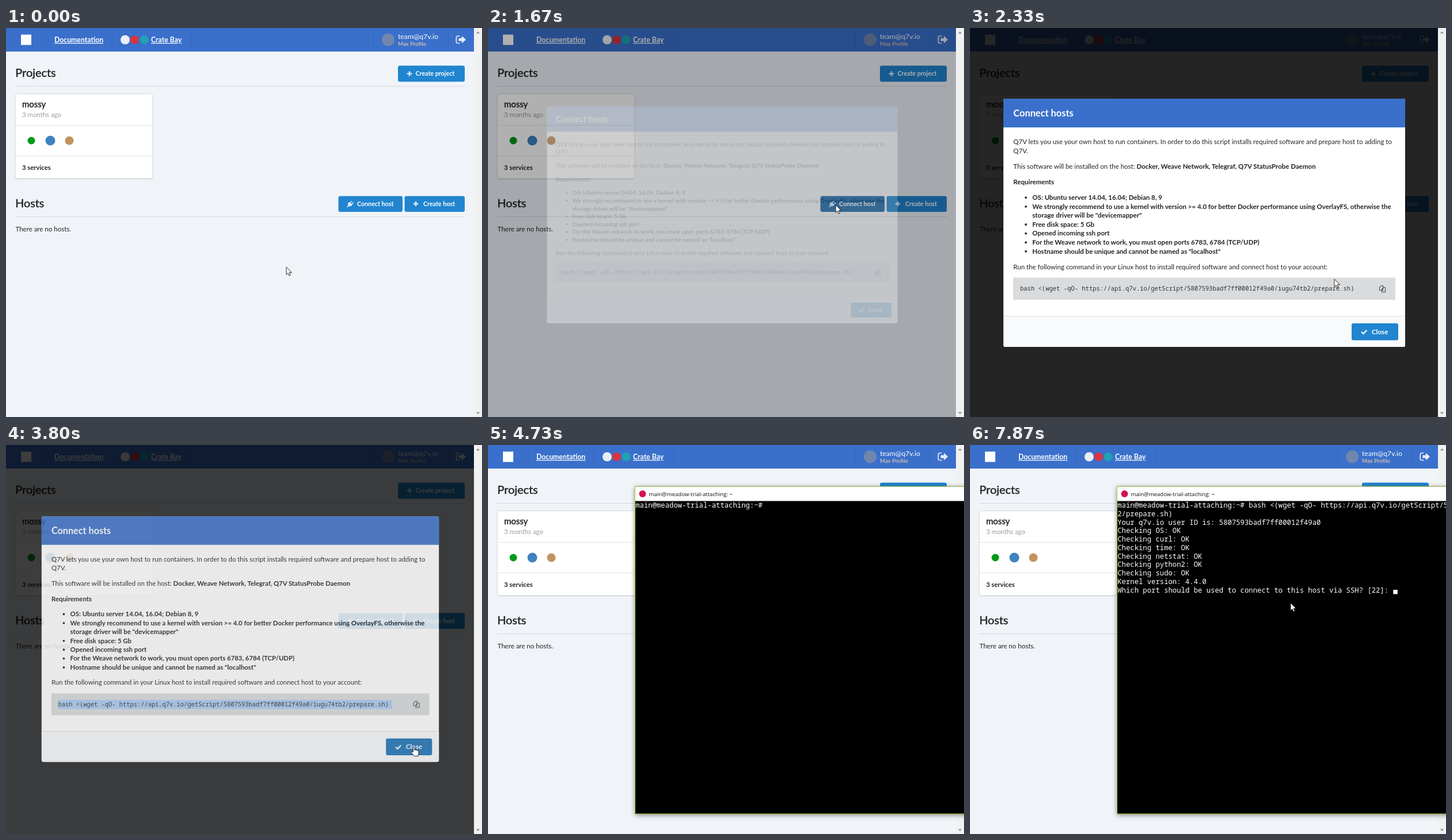
An HTML page for the animation above (8000 ms loop, 827x677 px).

```html
<!DOCTYPE html>
<html lang="en">
<head>
<meta charset="utf-8">
<title>Connect hosts</title>
<style>
html, body { margin: 0; width: 100%; height: 100%; overflow: hidden; background: #f0f4f9; }
svg { display: block; }
text { font: 11.45px Lato, sans-serif; fill: #212223; white-space: pre; }
.b { font-weight: 700; }
.w { fill: #fff; }
.mid { stroke: #212223; stroke-width: .45px; }
.code { font-family: "Noto Sans Mono", "DejaVu Sans Mono", monospace; }
</style>
</head>
<body>
<svg id="stage" width="827" height="677" viewBox="0 0 827 677"></svg>
<script>
const BLUE = '#2185d0', BAR = '#3a70cb';

const text = (x, y, str, size = 11.5, cls = '', style = '') =>
  `<text x="${x}" y="${y}" class="${cls}" style="font-size:${size}px;${style}">${str}</text>`;
const rect = (x, y, w, h, fill, extra = '') =>
  `<rect x="${x}" y="${y}" width="${w}" height="${h}" fill="${fill}" ${extra}/>`;
const dot = (x, y, r, fill) => `<circle cx="${x}" cy="${y}" r="${r}" fill="${fill}"/>`;
const path = (d, fill, extra = '') => `<path d="${d}" fill="${fill}" ${extra}/>`;
const line = (d, color, width = 1) =>
  path(d, 'none', `stroke="${color}" stroke-width="${width}"`);
const plus = (x, y) => line(`M${x - 4.3} ${y}h8.6M${x} ${y - 4.3}v8.6`, '#d8eaf7', 2.6);
const button = (x, y, w, h, id = '') => rect(x, y, w, h, BLUE, `rx="3.3" id="${id}"`);

const command = 'bash &lt;(wget -qO- https://api.q7v.io/getScript/5807593badf7ff00012f49a0/iugu74tb2/prepare.sh)';
const prompt = 'main@meadow-trial-attaching:~#';

const topBar = rect(0, 0, 813, 41, BAR)
  + line('M69.5 0v41M184.5 0v41M322.5 0v41M638.5 0v41M768.5 0v41', '#3566ba')
  + rect(26, 11.5, 18, 18, '#fff')
  + text(84, 25, 'Documentation', 12.25, 'b w', 'text-decoration:underline')
  + dot(207, 20.5, 8, '#e8eff7') + dot(223.5, 20.5, 7.5, '#d9343f') + dot(240, 20.5, 7.5, '#1fa3b5')
  + text(252, 25, 'Crate Bay', 12.25, 'b w', 'text-decoration:underline')
  + dot(664, 20.5, 11, '#7186ac')
  + text(681, 19, 'team@q7v.io', 12.25, 'w')
  + text(681, 31, 'Max Profile', 9.8, '', 'fill:#ffcfa0')
  + line('M788.5 14h-3.5q-2.7 0-2.7 2.7v7.1q0 2.7 2.7 2.7h3.5', '#e6edf8', 1.7)
  + path('M786.5 17.8h5.5v-4l7 6.5-7 6.5v-4h-5.5z', '#e6edf8');

const card = rect(16, 115, 239, 148.5, '#d9dde2', 'rx="4"')
  + rect(16, 114.5, 239, 147.5, '#fff', 'rx="3.5" stroke="#d0d1d4" stroke-width=".9"')
  + line('M16.5 169.5h238M16.5 222.5h238', '#e4e5e7')
  + text(28, 138, 'mossy', 14.9, 'mid')
  + text(28, 155, '3 months ago', 11.4, '', 'fill:#9b9c9d')
  + dot(44, 196, 6.5, '#009a1a') + dot(77, 196, 8.5, '#3f83c0') + dot(110, 196, 7.5, '#c2935e')
  + text(28, 246.5, '3 services', 11.3, 'b');

const page = rect(0, 0, 813, 677, '#f0f4f9') + topBar
  + text(16.3, 84.5, 'Projects', 19.9, 'mid')
  + button(681, 65.5, 116, 28) + plus(701, 79.5)
  + text(711.5, 83.4, 'Create project', 10.7, 'b w')
  + line('M16 101.5h781M16 328.5h781', '#d4d8dd')
  + card
  + text(16.3, 311.5, 'Hosts', 19.7, 'mid')
  + button(577.5, 292.5, 111.5, 27.5, 'connect')
  + path('M592 311l2.4-2.2q-1.6-3 1-5l1.4-1.2 5 5-1.2 1.4q-2 2.3-5 1l-2.3 2.2z', '#d8eaf7')
  + line('M598.5 303.8l2.6-2.6M601.2 306.4l2.6-2.6', '#d8eaf7', 1.5)
  + text(610, 310, 'Connect host', 10.7, 'b w')
  + button(692.5, 292.5, 104.5, 27.5) + plus(712, 306)
  + text(725, 310, 'Create host', 10.7, 'b w')
  + text(16.5, 354, 'There are no hosts.');

const scrollbar = rect(813, 0, 14, 677, '#f1f1f1')
  + path('M816.8 9.5h6.4l-3.2-3.6zM816.8 668.5h6.4l-3.2 3.6z', '#8c8c8c');

// A leading space marks a wrapped line without a bullet.
const bullets = [
  'OS: Ubuntu server 14.04, 16.04; Debian 8, 9',
  'We strongly recommend to use a kernel with version &gt;= 4.0 for better Docker performance using OverlayFS, otherwise the',
  ' storage driver will be "devicemapper"',
  'Free disk space: 5 Gb',
  'Opened incoming ssh port',
  'For the Weave network to work, you must open ports 6783, 6784 (TCP/UDP)',
  'Hostname should be unique and cannot be named as "localhost"'
].map((str, i) => {
  const y = 299 + i * 15.6;
  return text(108.3, y, str.trim(), 11.5, 'b') + (str[0] === ' ' ? '' : dot(97, y - 3.8, 1.9, '#212223'));
}).join('');

const modal = rect(58, 123, 698, 432, '#fff', 'rx="3.3"')
  + path('M58 173v-46.7q0-3.3 3.3-3.3h691.4q3.3 0 3.3 3.3v46.7z', BAR)
  + path('M58 502v49.7q0 3.3 3.3 3.3h691.4q3.3 0 3.3-3.3v-49.7z', '#f9fafb')
  + line('M58 501.5h698', '#dddedf')
  + text(75.3, 153.8, 'Connect hosts', 16.4, 'b w')
  + text(75.3, 202.3, 'Q7V lets you use your own host to run containers. In order to do this script installs required software and prepare host to adding to')
  + text(75.3, 217.8, 'Q7V.')
  + text(75.3, 245, 'This software will be installed on the host: <tspan class="b">Docker, Weave Network, Telegraf, Q7V StatusProbe Daemon</tspan>')
  + text(75.3, 272, 'Requirements', 11.5, 'b')
  + bullets
  + text(75.3, 419.5, 'Run the following command in your Linux host to install required software and connect host to your account:')
  + rect(75, 434.5, 664, 38.5, '#d9dbdd')
  + rect(87, 446, 587, 16, '#a9cbf2', 'id="selection"')
  + text(87, 457.3, command, 10.53, 'code', 'fill:#333')
  + path('M711.5 451.5l3-3h3v8h-6zM715.5 454.5l3-3h3v8h-6z', '#d9dbdd', 'stroke="#4a4b4c" stroke-width="1.1"')
  + button(663, 514, 81, 29.5, 'close')
  + line('M680.2 528.8l3.2 3.2 6-6.2', '#e4f0fa', 2.5)
  + text(698, 532.7, 'Close', 11.5, 'b w');

const dimmer = '<g id="dimmer">' + rect(0, 0, 813, 677, '#000', 'opacity=".85"')
  + `<g id="modal">${modal}</g></g>`;

const ROW = 14.77, COL = 7.37;
const output = [
  'Your q7v.io user ID is: 5807593badf7ff00012f49a0',
  ...['OS', 'curl', 'time', 'netstat', 'python2', 'sudo'].map(s => `Checking ${s}: OK`),
  'Kernel version: 4.4.0',
  'Which port should be used to connect to this host via SSH? [22]: '
];
const row = (i, str, id = '') =>
  `<g id="${id}">${text(256.2, 109 + i * ROW, str, 12.28, 'code w')}</g>`;
const terminal = '<g id="terminal">'
  + rect(255.5, 72, 600, 570, '#000', 'style="filter:drop-shadow(0 2px 4px #0007)"')
  + rect(255.5, 72, 600, 570, '#000', 'stroke="#b4cf2e"')
  + rect(256, 72.5, 600, 25, '#fff')
  + dot(268.5, 85, 6, '#d5134f')
  + text(279.5, 88.6, prompt.slice(0, -1).replace(':~', ': ~'), 9.6, '', 'font-family:\'Open Sans\',sans-serif;fill:#111')
  + row(0, prompt)
  + `<g id="pasted">${row(0, ' '.repeat(31) + command.slice(0, -13))}${row(1, '2/prepare.sh)')}</g>`
  + output.map((s, i) => row(i + 2, s, 'out' + i)).join('')
  + rect(0, 0, 7.5, 7.5, '#fff', 'id="block"') + '</g>';

const pointer = '<g id="pointer">'
  + path('M0 0v13.2l3-2.8 2 4.7 2.3-1-2-4.6h4.2z', '#fff', 'id="arrow" stroke="#111" stroke-width=".9"')
  + path('M1.3 9.5V1.2q1.3-1.8 2.6 0V6q1.4-.9 2.4.3 1.5-.8 2.4.5 1.8-.6 2.3 1v4.2l-1.4 4.6H3.3L-1.8 10.3q-.8-1.9 1-1.9z', '#fff', 'id="hand" stroke="#111" stroke-width=".9"')
  + '</g>';

const stage = document.getElementById('stage');
stage.innerHTML = page + scrollbar + dimmer + terminal + pointer;
const $ = id => document.getElementById(id);
const show = (id, on) => $(id).setAttribute('visibility', on ? 'inherit' : 'hidden');

const clamp = v => Math.min(1, Math.max(0, v));
const within = (t, a, b) => t >= a && t < b;

// CSS "ease": cubic-bezier(.25, .1, .25, 1)
function ease(x) {
  if (x <= 0 || x >= 1) return clamp(x);
  const bezier = (s, a, b) => 3 * a * s * (1 - s) ** 2 + 3 * b * s * s * (1 - s) + s ** 3;
  let lo = 0, hi = 1;
  for (let i = 0; i < 20; i++) {
    const mid = (lo + hi) / 2;
    if (bezier(mid, .25, .25) < x) lo = mid; else hi = mid;
  }
  return bezier(lo, .1, 1);
}

// time, x, y of the pointer tip
const route = [
  [735, 487, 416], [1200, 604, 308], [2070, 604, 308], [2330, 633, 437],
  [2600, 716, 451], [2930, 716, 451], [3200, 708, 503], [3530, 706, 525],
  [4060, 706, 525], [4330, 690, 695], [4800, 838, 443], [4870, 800, 421], [5330, 557, 275]
];
function pointerAt(t) {
  const i = route.findIndex(p => p[0] > t);
  if (i < 0) return route[route.length - 1].slice(1);
  if (!i) return route[0].slice(1);
  const [a, b] = [route[i - 1], route[i]];
  const k = clamp((t - a[0]) / (b[0] - a[0])), s = k * k * (3 - 2 * k);
  return [a[1] + (b[1] - a[1]) * s, a[2] + (b[2] - a[2]) * s];
}

function draw(t) {
  const [x, y] = pointerAt(t);
  $('pointer').setAttribute('transform', `translate(${x} ${y})`);
  show('pointer', !within(t, 4330, 4860));
  const hand = within(t, 2530, 2990) || within(t, 3260, 4100);
  show('hand', hand);
  show('arrow', !hand);

  $('connect').setAttribute('fill', within(t, 1130, 1900) ? '#1b68a7' : BLUE);
  $('close').setAttribute('fill', within(t, 3260, 4300) ? '#1b72b6' : BLUE);
  show('selection', t >= 2730);

  // The modal grows from 80% when it opens and shrinks to 90% when it closes.
  const opening = t < 3000;
  const p = opening ? ease((t - 1552) / 500) : 1 - ease((t - 3745) / 500);
  const scale = 1 - (opening ? .2 : .1) * (1 - p);
  show('dimmer', p > 0);
  $('dimmer').setAttribute('opacity', p);
  $('modal').setAttribute('opacity', p);
  $('modal').setAttribute('transform',
    `translate(407 231) scale(${scale}) translate(-407 -231)`);

  show('terminal', t >= 4730);
  show('pasted', t >= 5460);
  output.forEach((_, i) => show('out' + i, t >= (i < 6 ? 6595 : 6660)));
  const [c, r] = t < 5460 ? [31, 0] : t < 6595 ? [13, 1] : [65, 10];
  $('block').setAttribute('x', 256.3 + c * COL);
  $('block').setAttribute('y', 105 + r * 14.7);
  show('block', within(t, 5060, 6260) || within(t, 6660, 7325) || t >= 7860);
}

const STEP = 1000 / 15, began = performance.now();
function tick() {
  const t = (performance.now() - began) % 8000;
  draw(Math.floor((t + 4) / STEP) * STEP);
  requestAnimationFrame(tick);
}
tick();
</script>
</body>
</html>
```
